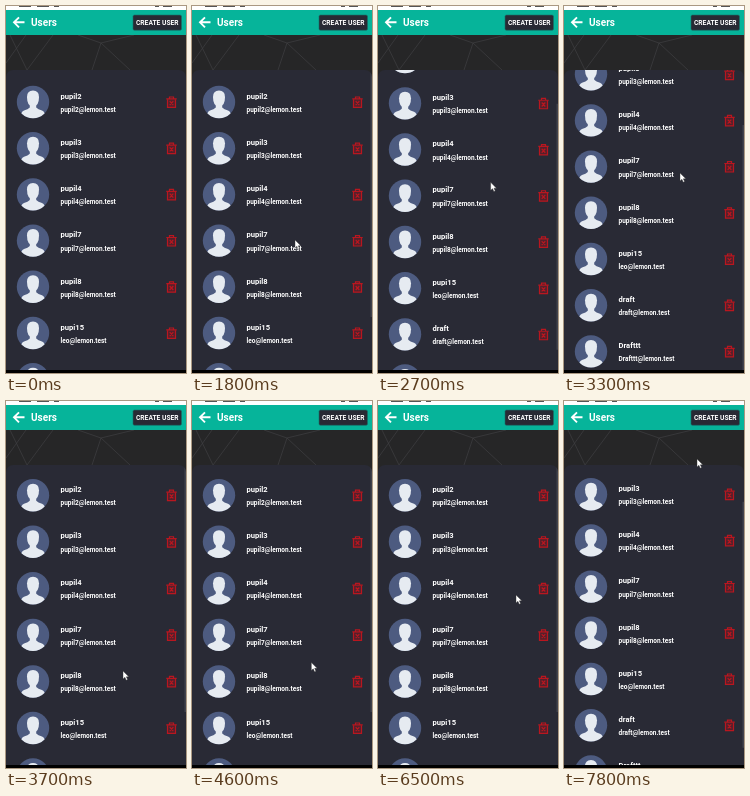
Write an HTML page that moves like this. It is 180 px wide and 367 px high and loops after 8000 ms.

```html
<!DOCTYPE html>
<html lang="en">
<head>
<meta charset="utf-8">
<title>Users</title>
<style>
html, body { margin: 0; width: 100%; height: 100%; overflow: hidden; background: #000; }
svg { display: block; width: 100%; height: 100%; font-family: Roboto, sans-serif; font-weight: 700; fill: #fff; }
.name { font-size: 7.6px; }
.mail { font-size: 6.5px; }
</style>
</head>
<body>
<svg viewBox="0 0 180 367">
  <defs>
    <clipPath id="disc"><circle r="16.2"/></clipPath>
    <clipPath id="panel"><rect y="64" width="180" height="310" rx="7"/></clipPath>
    <g id="avatar">
      <circle r="16.2" fill="#4d5b80"/>
      <g clip-path="url(#disc)" fill="#e6ebf1">
        <path d="M-6 -5Q-6 -11.5 0 -11.5Q6 -11.5 6 -5Q6 4.5 0 4.5Q-6 4.5 -6 -5Z"/>
        <path d="M-3.2 1H3.2V5.5Q5 7.5 9 8.5Q12.5 10 13 17H-13Q-12.5 10 -9 8.5Q-5 7.5 -3.2 5.5Z"/>
      </g>
    </g>
    <g id="trash" fill="#54202b" stroke="#b9161f" stroke-width="1.2">
      <path d="M-4 -3V5.2H4V-3"/>
      <path d="M-5.2 -3.3H5.2M-2 -3.5V-5.2H2V-3.5M-1.8 -1L1.8 3M1.8 -1L-1.8 3" fill="none"/>
    </g>
  </defs>

  <rect width="180" height="367"/>
  <path d="M13 0h12M31 0h12M48 0h5M149 0h4M157 0h9" stroke="#555" stroke-width="2"/>

  <rect y="28" width="180" height="336" fill="#262627"/>
  <path d="M0 57L20 29M4 29L21 64L47 29M72 29L95 37L86 64M124 64L95 37L128 29" fill="none" stroke="#404042" stroke-width=".7"/>
  <rect y="4" width="180" height="25" fill="#06b49a"/>
  <path d="M18.5 16.3H8.5M13 11.3L8 16.3L13 21.3" fill="none" stroke="#fff" stroke-width="1.9"/>
  <text x="25" y="20" font-size="10">Users</text>
  <rect x="127" y="9" width="48.5" height="15.3" rx="1.5" fill="#282a34" stroke="#176f68" stroke-width=".6"/>
  <text x="151.3" y="19" font-size="6.7" text-anchor="middle">CREATE USER</text>

  <g clip-path="url(#panel)">
    <rect y="64" width="180" height="300" fill="#292a35"/>
    <g id="list"></g>
    <rect id="thumb" x="178.5" width="1.5" height="246" fill="#41424c"/>
  </g>
  <rect y="364" width="180" height="3" fill="#000"/>
  <path id="cursor" d="M0 0V8L1.9 6.3L3.2 9.2L4.6 8.6L3.3 5.8H5.8Z" stroke="#333" stroke-width=".4"/>
</svg>
<script>
const LOOP = 8000, STEP = 100, PITCH = 46.2;
const host = "@lemon.test";
const users = [
  ["pupil2"], ["pupil3"], ["pupil4"], ["pupil7"], ["pupil8"],
  ["pupi15", "leo"], ["draft"], ["Drafttt"]
];
const glides = [
  { from: 900, to: 1500, x: 103, y: 234 },
  { from: 1800, to: 2400, x: 111, y: 181 },
  { from: 2400, to: 3300, x: 116, y: 167 },
  { from: 3300, to: 3700, x: 117, y: 270 },
  { from: 4500, to: 5400, x: 138, y: 194 },
  { from: 6900, to: 7800, x: 133, y: 58 }
];

const list = document.getElementById("list");
const thumb = document.getElementById("thumb");
const cursor = document.getElementById("cursor");

list.innerHTML = users.map(([name, box = name]) => `<g>
  <use href="#avatar" x="27"/>
  <text class="name" x="54.5" y="-3.3">${name}</text>
  <text class="mail" x="54.5" y="10">${box + host}</text>
  <use href="#trash" x="165.5" y=".2"/>
</g>`).join("");

const ramp = (t, from, to) => Math.min(1, Math.max(0, (t - from) / (to - from)));
const ease = (...args) => { const p = ramp(...args); return p * p * (3 - 2 * p); };
const move = (el, x, y) => el.setAttribute("transform", `translate(${x} ${y})`);

function draw(ms) {
  const t = Math.floor(ms % LOOP / STEP) * STEP;
  const down = ease(t, 1900, 3300), back = ease(t, 3300, 3700), again = ease(t, 6900, 7700);
  const offset = 74 * (down - back) + 49 * again;
  const stretch = 1.8 * (back - again); // overscroll, strongest at the top

  [...list.children].forEach((row, i) =>
    move(row, 0, 96 + PITCH * i - offset - stretch * (1 - i / 5)));
  move(thumb, 0, 65 + offset * 0.73);
  thumb.setAttribute("opacity", t < 1800 ? 0 : 1);

  let x = 190, y = 262;
  for (const g of glides) {
    const p = ramp(t, g.from, g.to);
    x += (g.x - x) * p;
    y += (g.y - y) * p;
  }
  move(cursor, x, y);
}

const start = performance.now();
function tick() {
  draw(performance.now() - start);
  requestAnimationFrame(tick);
}
tick();
</script>
</body>
</html>
```
